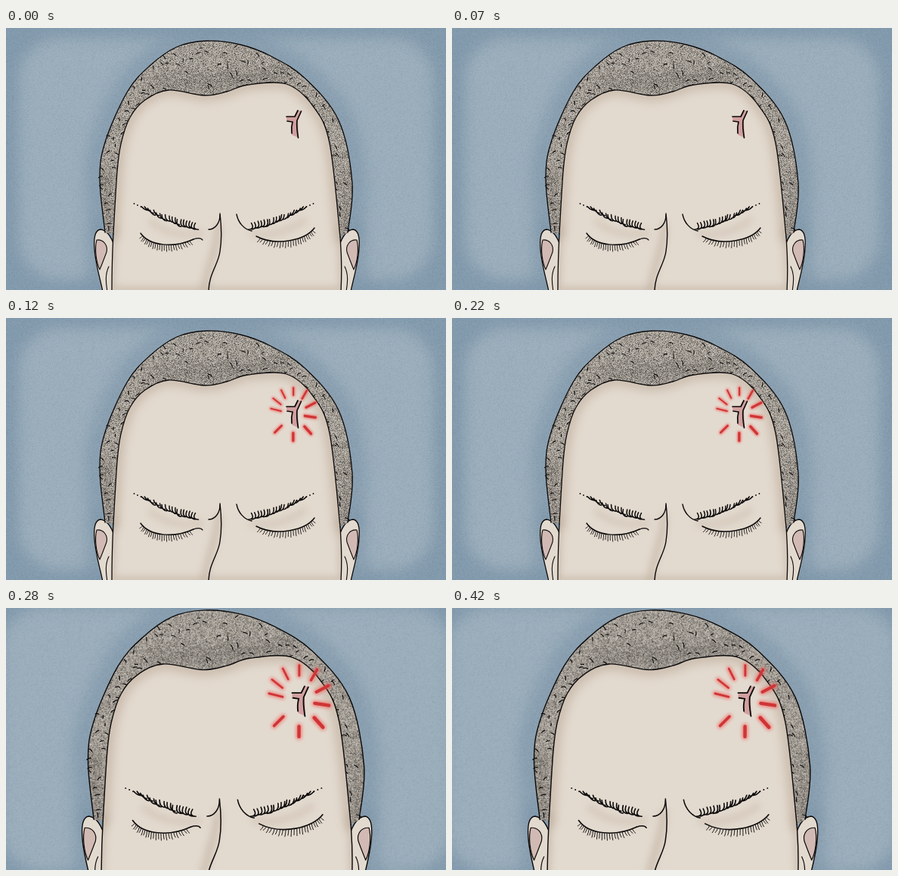
These frames come from a looping animation (582 by 346 pixels, 0.52 s). An HTML page with a canvas:

```html
<!DOCTYPE html>
<html lang="en">
<head>
<meta charset="utf-8">
<title>Throbbing headache</title>
<style>
html, body { margin: 0; width: 100%; height: 100%; overflow: hidden; background: #9cafbd; }
canvas { display: block; }
</style>
</head>
<body>
<canvas id="stage" width="582" height="346"></canvas>
<script>
const W = 582, H = 346, INK = '#0c0a0a', SKIN = '#e3dacf', SHADE = 'rgba(184,166,147,.5)';

// key points of the skull and the hairline, paired from left to right
const SKULL = [[131,270],[124,200],[131,151],[160,85],[190,50],[226,25],[265,17],
  [310,22],[350,37],[395,66],[440,122],[458,205],[452,270]];
const HAIRLINE = [[142,272],[147,190],[152,153],[164,118],[184,95],[215,82],[262,89],
  [292,84],[320,75],[371,74],[406,103],[428,152],[442,276]];

const POSES = [
  { until: 120, zoom: [1, 0, 0], rays: null },
  { until: 280, zoom: [1, 0, 0], rays: [1, 0, 0] },
  { until: 520, zoom: [1.093, -27, -15.7], rays: [1.345, -123.4, -48] }
];

const lerp = (a, b, t) => a + (b - a) * t;
const mixPoint = (p, q, t) => [lerp(p[0], q[0], t), lerp(p[1], q[1], t)];

function seeded(s) {
  return () => {
    s = (s + 0x6d2b79f5) | 0;
    let t = Math.imul(s ^ (s >>> 15), 1 | s);
    t = (t + Math.imul(t ^ (t >>> 7), 61 | t)) ^ t;
    return ((t ^ (t >>> 14)) >>> 0) / 4294967296;
  };
}

function sheet() {
  const c = document.createElement('canvas');
  c.width = W;
  c.height = H;
  return c;
}

// smooth curve through points
function spline(pts, path = new Path2D(), join = false) {
  path[join ? 'lineTo' : 'moveTo'](...pts[0]);
  for (let i = 0; i < pts.length - 1; i++) {
    const a = pts[i - 1] || pts[i], b = pts[i], c = pts[i + 1], d = pts[i + 2] || c;
    path.bezierCurveTo(b[0] + (c[0] - a[0]) / 6, b[1] + (c[1] - a[1]) / 6,
      c[0] - (d[0] - b[0]) / 6, c[1] - (d[1] - b[1]) / 6, ...c);
  }
  return path;
}

const skull = spline(SKULL), hairline = spline(HAIRLINE);
const hair = spline([...HAIRLINE].reverse(), spline(SKULL), true);
const face = spline(HAIRLINE);
for (const p of [[445, 310], [443, 346], [140, 346], [140, 310]]) face.lineTo(...p);

// grain as dark and light specks of varying strength
function makeGrain(seed, strength) {
  const c = sheet(), g = c.getContext('2d'), rnd = seeded(seed), img = g.createImageData(W, H);
  for (let i = 0; i < img.data.length; i += 4) {
    const v = rnd() + rnd() - 1;
    img.data.fill(v < 0 ? 20 : 235, i, i + 3);
    img.data[i + 3] = Math.abs(v) * strength;
  }
  g.putImageData(img, 0, 0);
  return c;
}
const coarse = makeGrain(7, 165), fine = makeGrain(19, 18);

function line(g, d, width = 1.3, color = INK) {
  g.strokeStyle = color;
  g.lineWidth = width;
  g.stroke(typeof d === 'string' ? new Path2D(d) : d);
}

function soft(g, d, width, color, blur) {
  g.save();
  g.filter = `blur(${blur}px)`;
  line(g, d, width, color);
  g.restore();
}

function mirrored(g, sum, draw) {
  draw();
  g.save();
  g.transform(-1, 0, 0, 1, sum, 0);
  draw();
  g.restore();
}

function drawBackdrop(g) {
  g.fillStyle = '#9cafbd';
  g.fillRect(0, 0, W, H);
  const edge = new Path2D();
  edge.rect(-40, -40, W + 80, H + 80);
  edge.roundRect(17, 13, W - 34, H - 26, 55);
  g.save();
  g.filter = 'blur(9px)';
  g.fillStyle = '#839bae';
  g.fill(edge, 'evenodd');
  g.restore();
  soft(g, skull, 40, 'rgba(126,150,171,.6)', 9);
  soft(g, 'M128 270L122 346M456 270L462 346', 36, 'rgba(126,150,171,.6)', 9);
  g.drawImage(fine, 0, 0);
}

function drawEar(g) {
  const rim = 'M143 287C139 275 133 267 125 266C117 267 116 278 117 291C118 310 124 329 128 348';
  const hollow = new Path2D('M120 280C129 279 135 287 133 296C130 304 127 312 124 319C119 309 117 291 120 280Z');
  g.fillStyle = SKIN;
  g.fill(new Path2D(rim + 'H148Z'));
  line(g, rim);
  g.fillStyle = '#d2bab4';
  g.fill(hollow);
  line(g, hollow, 1.1);
  line(g, 'M136 315C131 325 132 336 134 348', 1.1);
}

function drawHair(g) {
  g.save();
  g.clip(hair);
  g.fillStyle = '#a8a197';
  g.fillRect(0, 0, W, H);
  soft(g, 'M205 75C240 68 290 78 370 58', 18, 'rgba(50,45,42,.25)', 9);
  soft(g, 'M129 190L135 270M455 190L449 270', 12, 'rgba(50,45,42,.28)', 7);
  g.drawImage(coarse, 0, 0);
  g.restore();

  const rnd = seeded(42), bristles = new Path2D(), last = SKULL.length - 1;
  for (let i = 0; i < 85; i++) {
    const u = (i + rnd()) / 85 * last, n = Math.min(u | 0, last - 1);
    const [x, y] = mixPoint(mixPoint(SKULL[n], SKULL[n + 1], u - n),
      mixPoint(HAIRLINE[n], HAIRLINE[n + 1], u - n), rnd() * .95);
    const a = rnd() * 2.6 - .8, r = 1.6 + rnd() * 1.4, dx = Math.cos(a) * r, dy = Math.sin(a) * r;
    bristles.moveTo(x - dx, y - dy);
    bristles.quadraticCurveTo(x + dy * .4, y - dx * .4, x + dx, y + dy);
  }
  line(g, bristles, 1.1);
}

function drawFace(g) {
  g.fillStyle = SKIN;
  g.fill(face);
  g.save();
  g.clip(face);
  soft(g, hairline, 17, SHADE, 6);
  soft(g, 'M142 265L139 346H445L442 265', 9, SHADE, 5);
  soft(g, 'M281 262C280 290 266 315 262 346', 9, SHADE, 5);
  soft(g, 'M192 256C210 271 235 275 258 271M326 272C350 275 375 268 394 254', 8, 'rgba(184,166,147,.35)', 5);
  g.restore();
  line(g, hairline);
  line(g, 'M142 272C141 290 140 310 140 348M442 276C443 292 445 310 443 348');
}

// hairs lean outwards at the tail and curl towards the nose
function drawBrow(g, from, to, side) {
  const p = new Path2D(), rnd = seeded(5), count = 19;
  for (let i = 0; i < count; i++) {
    const t = i / (count - 1), [bx, by] = mixPoint(from, to, t);
    const x = bx + rnd() * 2 - 1, y = by + 3 * Math.sin(t * Math.PI) + rnd() * 2 - 1;
    const len = 5 + 5 * Math.sin(t * 2.3) + rnd();
    p.moveTo(x - side * lerp(4, 0, t), y - len * .5);
    p.quadraticCurveTo(x - side * 5 * t, y + len * .35, x + side * 4, y + len * .4);
  }
  line(g, p, 1.5);
  g.fillStyle = INK;
  for (let i = 1; i < 4; i++) {
    g.beginPath();
    g.arc(from[0] - side * i * 4.5, from[1] - i * 2, .9, 0, 7);
    g.fill();
  }
}

// lid is a cubic given by four points
function drawEye(g, lid) {
  const [a, b, c, d] = lid, p = new Path2D(), count = 24;
  const at = (t, k) => (1 - t) ** 3 * a[k] + 3 * t * (1 - t) ** 2 * b[k] + 3 * t * t * (1 - t) * c[k] + t ** 3 * d[k];
  line(g, `M${a}C${b} ${c} ${d}`, 1.5);
  for (let i = 0; i < count; i++) {
    const t = lerp(.06, .94, i / (count - 1)), x = at(t, 0), y = at(t, 1);
    const len = 3 + 4.5 * Math.sin(t * Math.PI) + (i % 2) * 1.5, lean = (t - .5) * Math.sign(d[0] - a[0]) * 8;
    p.moveTo(x, y + 1);
    p.quadraticCurveTo(x + lean * .25, y + len * .6, x + lean, y + len);
  }
  line(g, p, .85);
}

function drawFeatures(g) {
  drawBrow(g, [183, 238], [251, 263], 1);
  drawBrow(g, [393, 238], [325, 263], -1);
  drawEye(g, [[178, 271], [190, 288], [222, 291], [248, 279]]);
  line(g, 'M248 279C254 277 258 277 260 280');
  drawEye(g, [[408, 264], [396, 280], [358, 289], [331, 275]]);
  line(g, 'M283 245C285 262 285 283 283 295C281 312 268 325 268 348', 1.4);
  line(g, 'M283 247C283 257 277 266 268 266M305 246C307 257 315 266 325 268', 1.4);
}

function drawVein(g) {
  g.fillStyle = '#d1a09f';
  g.fill(new Path2D('M371 117H382L386 109H391L386 122L387 145L378 141V124L371 123Z'));
  line(g, 'M371 117H382L386 109M390.5 110L385 122Q384 130 386.5 145M372 123L379 124Q377 131 378 139', 1.7);
}

// rays gather towards the top of the ring and stretch along its width
function drawRays(g, [s, x, y]) {
  g.setTransform(s, 0, 0, s, x, y);
  for (let i = 0; i < 10; i++) {
    const a = (194 + 36 * i - 42 * Math.sin(Math.PI * i / 11)) * Math.PI / 180;
    const cos = Math.cos(a), sin = Math.sin(a);
    const near = 14 + 11 * Math.abs(sin), far = near + 10 + 4 * Math.abs(cos);
    const width = 2.7 + .8 * Math.cos(a - Math.PI / 4);
    const d = `M${380 + near * cos} ${127 + near * sin}L${380 + far * cos} ${127 + far * sin}`;
    soft(g, d, width + 2.5, 'rgba(242,92,88,.7)', 1.7 * s);
    line(g, d, width, '#cf3536');
  }
}

function render({ zoom: [s, x, y], rays }) {
  const c = sheet(), g = c.getContext('2d');
  g.setTransform(s, 0, 0, s, x, y);
  g.lineCap = g.lineJoin = 'round';
  drawBackdrop(g);
  mirrored(g, 584, () => drawEar(g));
  drawHair(g);
  drawFace(g);
  line(g, skull);
  drawFeatures(g);
  drawVein(g);
  if (rays) drawRays(g, rays);
  return c;
}

const scenes = POSES.map(render);
const view = document.getElementById('stage').getContext('2d');
const start = performance.now();

function tick() {
  const t = (performance.now() - start) % 520;
  view.drawImage(scenes[POSES.findIndex(p => t < p.until)], 0, 0);
  requestAnimationFrame(tick);
}
tick();
</script>
</body>
</html>
```
